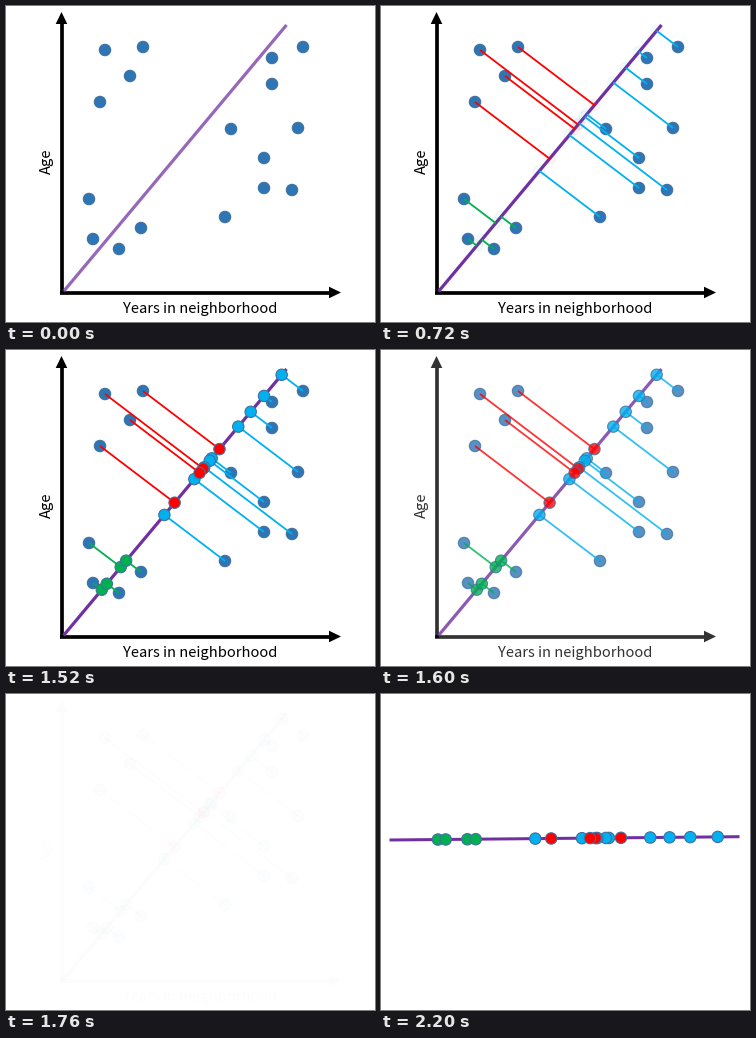
These frames come from a looping animation (369 by 316 pixels, 3680 ms). A matplotlib script:

```python
import numpy as np
import matplotlib.pyplot as plt
from matplotlib.animation import FuncAnimation
from matplotlib.patches import Circle, Polygon

W, H, DPI = 369, 316, 100
STEP, FRAMES = 40, 92
PX = 72 / DPI

PURPLE, DOT, EDGE = "#7030A0", "#2E75B6", "#41719C"
RED, BLUE, GREEN = "#FF0000", "#00B0F0", "#00B050"

POINTS = np.array([
    (83, 193), (135, 222), (87, 233), (113, 243),
    (297, 41), (266, 52), (266, 78), (292, 122), (225, 123),
    (258, 152), (286, 184), (258, 182), (219, 211),
    (99, 44), (137, 41), (124, 70), (94, 96),
], float)

# fitted line, the direction points slide onto it, and the flattened line
START, END = np.array([57.5, 285.5]), np.array([280.5, 19])
SLIDE = np.array([1, 0.76])
FLAT_START, FLAT_END = np.array([8.5, 146]), np.array([358.5, 142.7])
FLAT_X0, FLAT_SPAN = -2.7, 347

fig = plt.figure(figsize=(W / DPI, H / DPI), dpi=DPI, facecolor="white")
ax = fig.add_axes([0, 0, 1, 1])
ax.set_xlim(0, W)
ax.set_ylim(H, 0)
ax.axis("off")


def cross(a, b):
    return a[0] * b[1] - a[1] * b[0]


def project(p):
    """Place along the fitted line (0..1) where p lands, and its cluster colour."""
    run = END - START
    t = cross(p - START, SLIDE) / cross(run, SLIDE)
    if t < 0.4:
        return t, GREEN
    return t, RED if cross(run, p - START) < 0 else BLUE


def flat_spot(t):
    x = FLAT_X0 + FLAT_SPAN * t
    return x, np.interp(x, *zip(FLAT_START, FLAT_END))


def line(p, q, color, width, z):
    return ax.plot(*zip(p, q), color=color, lw=width * PX, zorder=z,
                   solid_capstyle="butt")[0]


def dot(p, color, z):
    return ax.add_patch(Circle(p, 5.7, fc=color, ec=EDGE, lw=1.1 * PX, zorder=z))


def arrow(tail, tip):
    tail, tip = np.array(tail), np.array(tip)
    d = (tip - tail) / np.hypot(*(tip - tail))
    side = 5.8 * np.array([-d[1], d[0]])
    base = tip - 12 * d
    head = Polygon([tip, base + side, base - side], fc="black", lw=0, zorder=1)
    return [line(tail, base, "black", 3.7, 1), ax.add_patch(head)]


def label(x, y, text, **kw):
    return ax.text(x, y, text, family="Noto Sans CJK JP", fontsize=14.8 * PX,
                   ha="center", va="center", **kw)


chart = arrow((55.5, 288), (55.5, 6)) + arrow((54, 286.5), (335, 286.5))
chart += [label(194, 303, "Years in neighborhood"),
          label(40.5, 155, "Age", rotation=90)]
fit = [line(START, END, PURPLE, 3.2, 2)]
flat = [line(FLAT_START, FLAT_END, PURPLE, 3, 2)]
links, feet = [], []
for p in POINTS:
    t, color = project(p)
    foot = START + t * (END - START)
    chart.append(dot(p, DOT, 3))
    links.append(line(p, foot, color, 1.8, 4))
    feet.append(dot(foot, color, 5))
    flat.append(dot(flat_spot(t), color, 5))


def fade_in(n, start):
    return 0 if n < start else min(1, 0.05 + 0.2 * (n - start))


def fade_out(n):
    return 0 if n >= 50 else float(np.clip(1 - 0.2 * (n - 39), 0.012, 1))


def show(group, alpha):
    for art in group:
        art.set_alpha(alpha)
        art.set_visible(alpha > 0)


def update(n):
    out = fade_out(n)
    show(chart, out)
    show(fit, out * min(1, 0.73 + 0.17 * n))
    show(links, out * fade_in(n, 7))
    show(feet, out * fade_in(n, 18))
    show(flat, fade_in(n, 50))
    return []


anim = FuncAnimation(fig, update, frames=FRAMES, interval=STEP,
                     init_func=lambda: update(0), repeat=True, repeat_delay=0)
plt.show()
```
